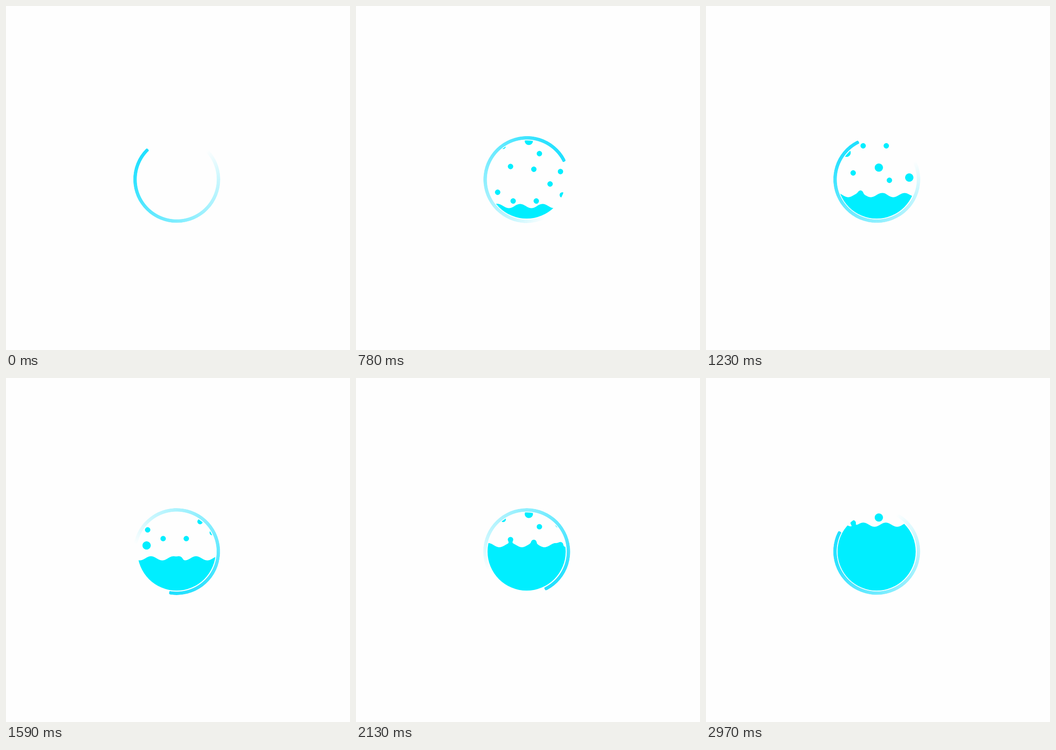
Recreate the animation shown at these times as an HTML page. Size 748 by 748 pixels, loop 3 s.

```html
<!DOCTYPE html>
<html lang="en">
<head>
<meta charset="utf-8">
<title>Filling loader</title>
<style>
  html, body { margin: 0; width: 100%; height: 100%; overflow: hidden; background: #fefefe; }
  svg { position: absolute; left: 0; top: 0; }
  #ring { position: absolute; left: 277px; top: 283.2px; width: 188.6px; height: 188.6px; }
  #ring::before {
    content: ""; position: absolute; inset: 0; border-radius: 50%;
    background: conic-gradient(from 90deg, #1fe0ff00 92deg, #1fe0ff3d 136deg,
      #1fe0ff91 226deg, #1fe0ffed 317deg, #1fe0ff 360deg);
    -webkit-mask: radial-gradient(circle, #0000 86.6px, #000 87.4px);
    mask: radial-gradient(circle, #0000 86.6px, #000 87.4px);
  }
  #ring::after {
    content: ""; position: absolute; right: 0; top: 90.7px;
    width: 7.2px; height: 7.2px; border-radius: 50%; background: #1fe0ff;
    clip-path: inset(3.6px 0 0 0);
  }
</style>
</head>
<body>
<svg width="748" height="748" viewBox="0 0 748 748">
  <defs>
    <clipPath id="bowl"><circle cx="371" cy="377.3" r="85"/></clipPath>
    <filter id="goo" filterUnits="userSpaceOnUse" x="250" y="250" width="240" height="260"
            color-interpolation-filters="sRGB">
      <feGaussianBlur stdDeviation="2.5"/>
      <feColorMatrix values="1 0 0 0 0  0 1 0 0 0  0 0 1 0 0  0 0 0 8 -3.5"/>
    </filter>
  </defs>
  <g clip-path="url(#bowl)">
    <g filter="url(#goo)" fill="#00eeff">
      <path id="water"/>
      <path id="bubbles"/>
    </g>
  </g>
</svg>
<div id="ring"></div>
<script>
const LOOP = 3000, STEP = 30, SPACING = 178, WAVE = 49;
const SMALL = 6.4, BIG = 9.4;
const water = document.getElementById('water');
const bubbles = document.getElementById('bubbles');
const ring = document.getElementById('ring');

// One swarm of bubbles: x, y, radius
const swarm = [
  [422, 313, SMALL], [448.5, 337, SMALL], [308, 331, SMALL], [341.7, 350, SMALL],
  [392, 350, SMALL], [305.7, 365, BIG], [375.8, 397.3, BIG], [320, 409, SMALL],
  [398.8, 425, SMALL], [442, 419, BIG], [336, 453, SMALL], [386.7, 459, SMALL],
  [444.6, 464, SMALL]
];

// Distance risen by the swarm: time, pixels
const rise = [[0, -155], [420, 0], [780, 104], [1230, 224], [1590, 356.8],
              [2130, 457.6], [2970, 628], [3000, 634]];

function risen(t) {
  const i = rise.findIndex(k => k[0] > t);
  const [t0, y0] = rise[i - 1], [t1, y1] = rise[i];
  return y0 + (y1 - y0) * (t - t0) / (t1 - t0);
}

function waterPath(t) {
  const level = 435 - (t - 780) * (t < 780 ? 0.092 : 0.053);
  const crest = 357 - 0.0516 * (t - 780);
  let d = 'M270 500';
  for (let x = 270; x <= 472; x += 2) {
    const y = level - 4.8 * Math.cos(2 * Math.PI * (x - crest) / WAVE);
    d += `L${x} ${y.toFixed(2)}`;
  }
  return d + 'L472 500Z';
}

function bubblePath(t) {
  const up = risen(t), lag = Math.max(0, 780 - t) * 0.06;
  let d = '';
  for (let n = 0; n < 6; n++) {
    for (const [x, y0, r] of swarm) {
      const start = y0 + n * SPACING;
      const y = start - up + (start > 440 ? lag : 0);
      if (y > 270 && y < 490) {
        d += `M${x - r} ${y}a${r} ${r} 0 1 1 ${2 * r} 0a${r} ${r} 0 1 1 ${-2 * r} 0Z`;
      }
    }
  }
  return d;
}

function draw(now) {
  const t = Math.floor(now % LOOP / STEP) * STEP;
  water.setAttribute('d', waterPath(t));
  bubbles.setAttribute('d', bubblePath(t));
  ring.style.transform = `rotate(${224.3 + 0.6 * t}deg)`;
}

const begin = performance.now();
function tick() {
  draw(performance.now() - begin);
  requestAnimationFrame(tick);
}
tick();
</script>
</body>
</html>
```
